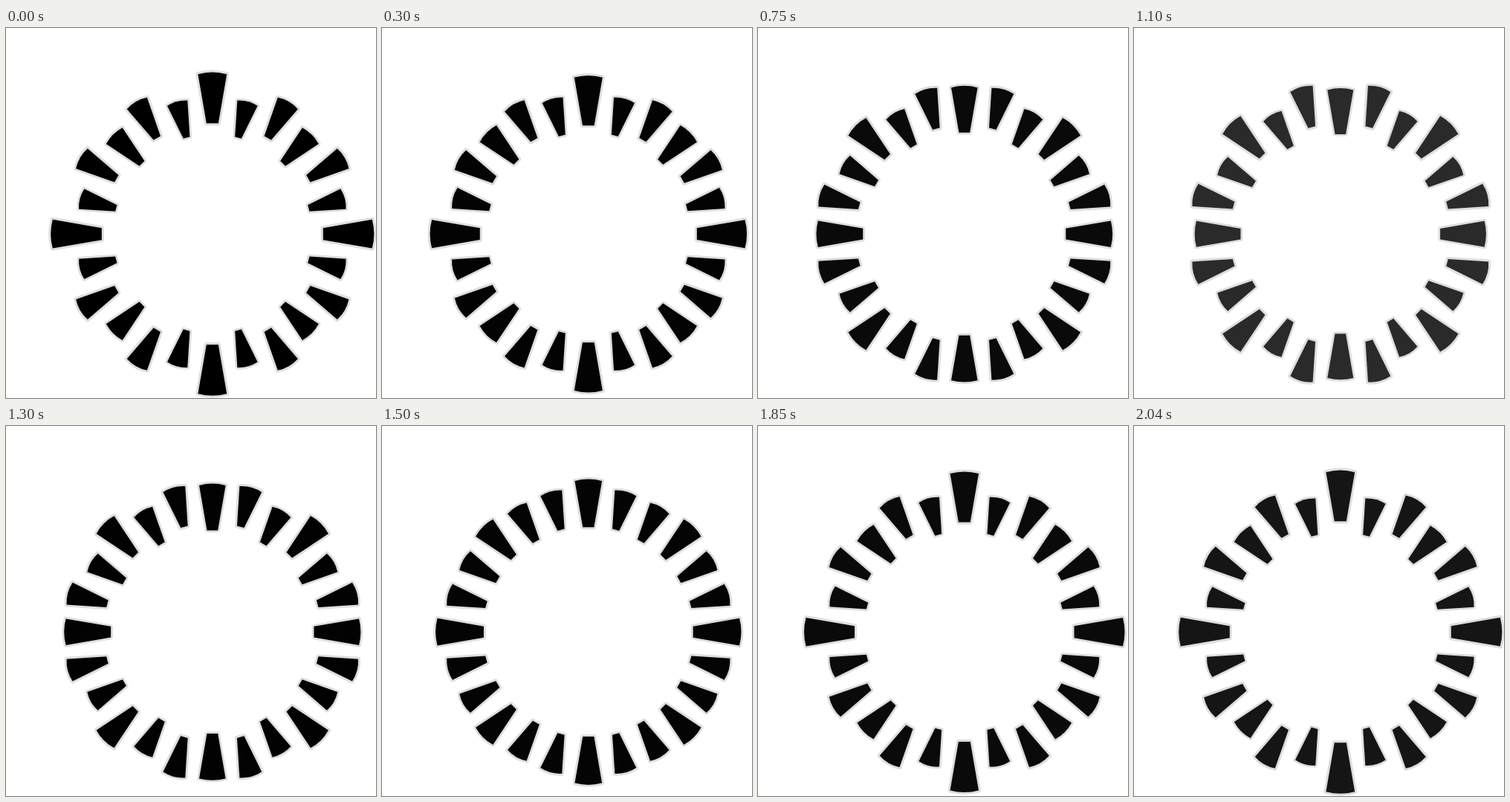
Animation of 498 by 498 pixels, one loop 2140 ms. Source, as an HTML page with a canvas:

```html
<!DOCTYPE html>
<html lang="en">
<head>
<meta charset="utf-8">
<title>Pulsing ring</title>
<style>
  html, body { margin: 0; width: 100%; height: 100%; overflow: hidden; background: #fff; }
  canvas { display: block; }
</style>
</head>
<body>
<canvas id="stage" width="498" height="498"></canvas>
<script>
const ctx = document.getElementById('stage').getContext('2d');
const LOOP = 2140, PERIOD = 2040, FADE = 1100, STEP = 50;
const COUNT = 24, INNER = 149, BULGE = 2.6;

// Half widths at the inner and outer end, and the radius of the outer corners
const CROSS = { near: 8, far: 19.4, outer: 215 };
const SLIM = { near: 5, far: 15.7, outer: 202.5 };
const EVEN = { near: 5.4, far: 15.6, outer: 203 };
const DIAGONAL = { near: 5.4, far: 17.2, outer: 207.5 };
const KINDS = [CROSS, SLIM, EVEN, DIAGONAL, EVEN, SLIM];

function wedge({ near, far, outer }) {
  ctx.beginPath();
  ctx.moveTo(-near, -INNER);
  ctx.lineTo(-far, -outer);
  ctx.quadraticCurveTo(0, -outer - 2 * BULGE, far, -outer);
  ctx.lineTo(near, -INNER);
  ctx.closePath();
  ctx.stroke();
  ctx.fill();
}

function draw(t) {
  const swing = 0.05 * Math.cos(2 * Math.PI * t / PERIOD);
  const u = t > FADE ? (t - FADE) / FADE : t / FADE;
  const level = Math.round(10 * u + 32 * u ** 6);

  ctx.fillStyle = '#fff';
  ctx.fillRect(0, 0, 498, 498);
  ctx.fillStyle = `rgb(${level},${level},${level})`;
  ctx.strokeStyle = '#dedede';
  ctx.lineWidth = 6;
  ctx.lineJoin = 'round';

  for (let i = 0; i < COUNT; i++) {
    const scale = 0.95 + (i % 2 ? -swing : swing);
    ctx.save();
    ctx.translate(277.8, 277.2);
    ctx.rotate(i * 2 * Math.PI / COUNT);
    ctx.scale(scale, scale);
    wedge(KINDS[i % KINDS.length]);
    ctx.restore();
  }
}

const start = performance.now();
function tick() {
  const t = (performance.now() - start) % LOOP;
  draw(t >= PERIOD ? PERIOD : Math.floor(t / STEP) * STEP);
  requestAnimationFrame(tick);
}
tick();
</script>
</body>
</html>
```
